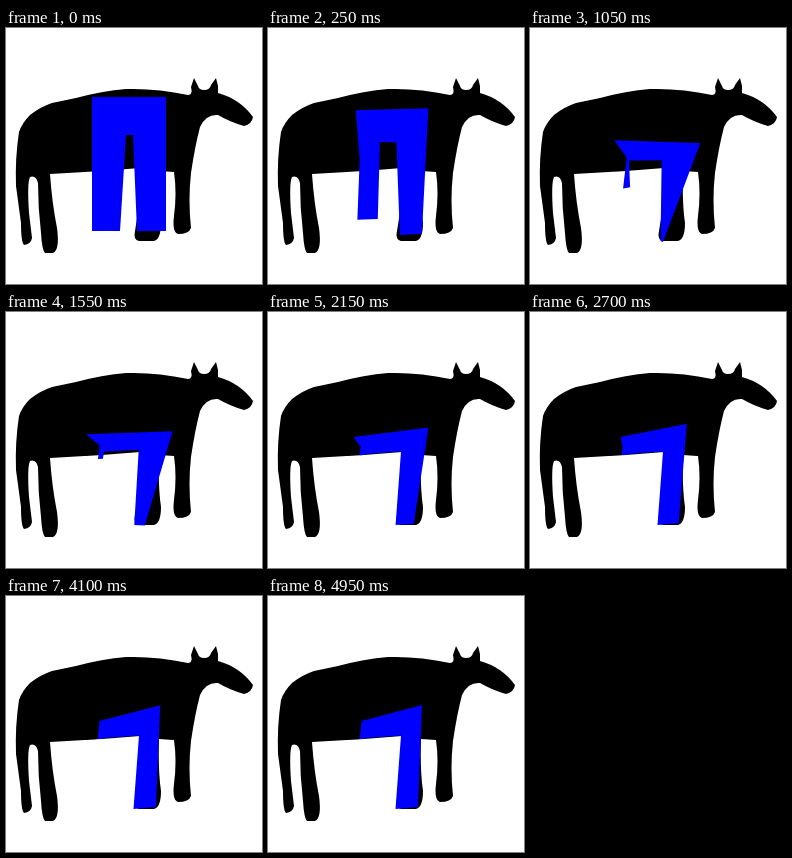
These frames come from a looping animation (256x256 px, 5000 ms). An HTML page:

```html
<!DOCTYPE html>
<html lang="en">
<head>
<meta charset="utf-8">
<title>Trousers and animal</title>
<style>
  html, body { margin: 0; width: 100%; height: 100%; overflow: hidden; background: #fff; }
  svg { display: block; width: 256px; height: 256px; }
</style>
</head>
<body>
<svg viewBox="0 0 256 256">
  <path d="M13 104Q16 95 24 87Q34 79 46 75L70 70Q96 63 120 61Q150 60 182 67Q187 67 185 59L188 50L192 58Q193 62 198 62Q204 62 205 57L210 50L212 58V65Q234 71 247 89Q246 96 238 98Q224 94 212 87Q200 86 194 99Q189 118 185 145Q182 172 185 200Q183 206 172 206Q166 204 168 188Q171 165 168 144L153 143Q152 175 155 195Q155 211 148 213H133Q127 212 129 203Q135 170 134 140L96 143L44 146Q46 175 51 200Q54 222 47 225H39Q36 222 35 205Q32 180 32 155Q30 147 24 149Q21 155 23 185L26 210Q25 216 18 217Q15 214 15 195L10 158Q9 130 13 104Z"/>
  <polygon id="trousers" fill="#00f"/>
</svg>
<script>
  const LOOP = 5000, STEP = 50, SETTLE = 2000;
  const trousers = document.getElementById('trousers');

  // A corner settles from one place to another, with a swing on the way.
  const corner = (from, to, swing = [0, 0], peak = 600, sharp = 3) => t => {
    const fade = Math.max(0, 1 - t / SETTLE) ** 2;
    const u = t / peak;
    const bump = (u * Math.exp(1 - u)) ** sharp;
    return from.map((a, i) => to[i] + (a - to[i]) * fade + swing[i] * bump);
  };

  const corners = [
    corner([86, 69], [93.5, 125], [-13, 0], 1550, 8),   // waist
    corner([160, 69], [154, 109], [15, 15], 1100),
    corner([160, 203], [150, 211], [-20, 5], 900),      // right foot
    corner([131, 203], [127.5, 213], [4, 4]),
    corner([127, 107], [133, 139.5]),                   // crotch
    corner([120, 107], [98, 142], [-7, -3]),
    corner([114, 203], [96, 143], [0, 5]),              // left foot
    corner([86, 203], [91.5, 143], [5, 7]),
    corner([86, 136], [92.5, 135], [10, -10])           // left side
  ];

  function draw(now) {
    const t = Math.floor(now % LOOP / STEP) * STEP;
    trousers.setAttribute('points', corners.map(at => at(t)).join(' '));
    requestAnimationFrame(draw);
  }
  draw(0);
</script>
</body>
</html>
```
